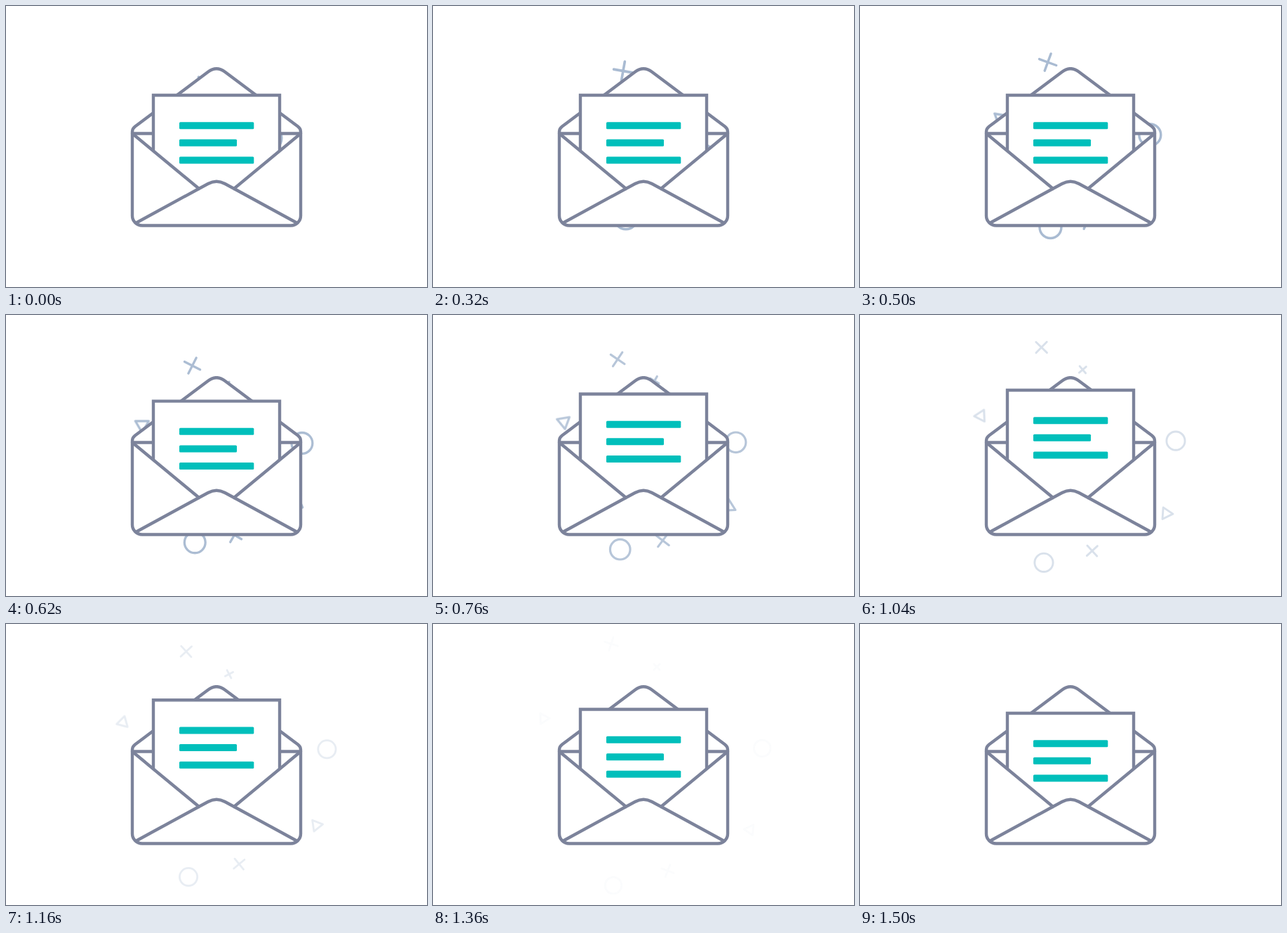
Recreate the animation shown at these times as an HTML page. Size 600 by 400 pixels, loop 2.02 s.

```html
<!DOCTYPE html>
<html lang="en">
<head>
<meta charset="utf-8">
<title>Open envelope</title>
<style>
  html, body { margin: 0; width: 100%; height: 100%; overflow: hidden; background: #fff; }
  svg { display: block; width: 600px; height: 400px; }
  .line { fill: #fff; stroke: #7c839b; stroke-width: 4.4; stroke-linejoin: round; }
  #confetti { fill: none; stroke: #a9bbd2; stroke-width: 4; stroke-linecap: round; stroke-linejoin: round; }
</style>
</head>
<body>
<svg viewBox="0 0 600 400">
  <g id="confetti"></g>
  <path class="line" d="M180 181.5V179Q180 174.5 184 171.5L288 93.7Q300 84.7 312 93.7L416 171.5Q420 174.5 420 179V181.5Z"/>
  <g id="letter">
    <path class="line" style="stroke-linejoin:miter" d="M210 127H390V290H210Z"/>
    <g fill="#00bfbb">
      <rect x="247" y="165.2" width="106.3" height="10" rx="1.5"/>
      <rect x="247" y="189.8" width="82" height="10" rx="1.5"/>
      <rect x="247" y="214.4" width="106.3" height="10" rx="1.5"/>
    </g>
  </g>
  <path class="line" d="M180 181.5L275 260L288 253Q300 246.4 312 253L325 260L420 181.5V298.5A14 14 0 0 1 406 312.5H194A14 14 0 0 1 180 298.5Z"/>
  <path class="line" style="fill:none" d="M275 260L185 309M325 260L415 309"/>
</svg>
<script>
const LOOP = 2020, ACTIVE = 1500;
const confetti = document.getElementById('confetti');
const letter = document.getElementById('letter');

// Spin in degrees at each of these times
const times = [0, 320, 620, 900, 1160, 1360, 1500];
const spins = {
  cross: [-10, 10, 27, 41, 47, 108, 130],
  small: [5, 15, 25, 35, 62, 135, 160],
  triangle: [45, 25, 0, -19, -45, -92, -125],
  circle: [0, 0, 0, 0, 0, 0, 0]
};

const cross = r => `M${-r} 0H${r}M0 ${-r}V${r}`;
const circle = r => `M${r} 0A${r} ${r} 0 1 1 ${-r} 0A${r} ${r} 0 1 1 ${r} 0Z`;
const triangle = r => `M${r} 0L${-r / 2} ${r * 0.866}V${-r * 0.866}Z`;

const shapes = [
  { d: cross(15), spin: 'cross', turn: 0, from: [277.2, 116], to: [252, 21] },
  { d: cross(9), spin: 'small', turn: 0, from: [310.7, 143], to: [319.7, 54.5] },
  { d: cross(14), spin: 'cross', turn: 3, from: [316.5, 275], to: [336, 357.5] },
  { d: circle(18), spin: 'circle', turn: 0, from: [281.5, 275.5], to: [255, 380] },
  { d: circle(18), spin: 'circle', turn: 0, from: [374.5, 188], to: [477, 176] },
  { d: triangle(13.2), spin: 'triangle', turn: 90, from: [230.5, 178.5], to: [151.5, 131] },
  { d: triangle(13.2), spin: 'triangle', turn: 37, from: [376, 242], to: [458, 297] }
];
for (const shape of shapes) {
  shape.el = document.createElementNS(confetti.namespaceURI, 'path');
  shape.el.setAttribute('d', shape.d);
  confetti.append(shape.el);
}

const mix = (a, b, k) => a + (b - a) * k;
const smooth = (t, start, end) => {
  const k = Math.min(1, Math.max(0, (t - start) / (end - start)));
  return k * k * (3 - 2 * k);
};
function spinAt(values, t) {
  const i = Math.max(1, times.findIndex(time => t <= time));
  return mix(values[i - 1], values[i], (t - times[i - 1]) / (times[i] - times[i - 1]));
}

function draw(now) {
  const t = Math.min(now % LOOP, ACTIVE);
  const u = t / ACTIVE, travel = u * (1.2 - 0.2 * u);
  const lift = 20 * (smooth(t, 500, 900) - smooth(t, 1100, 1500));
  letter.setAttribute('transform', `translate(0 ${-lift})`);
  confetti.setAttribute('opacity', 1 - smooth(t, 500, ACTIVE));
  for (const { el, spin, turn, from, to } of shapes) {
    const x = mix(from[0], to[0], travel), y = mix(from[1], to[1], travel);
    const angle = turn + spinAt(spins[spin], t);
    el.setAttribute('transform', `translate(${x} ${y}) rotate(${angle}) scale(${1 - 0.37 * travel})`);
  }
}

const start = performance.now();
function tick() {
  draw(performance.now() - start);
  requestAnimationFrame(tick);
}
tick();
</script>
</body>
</html>
```
